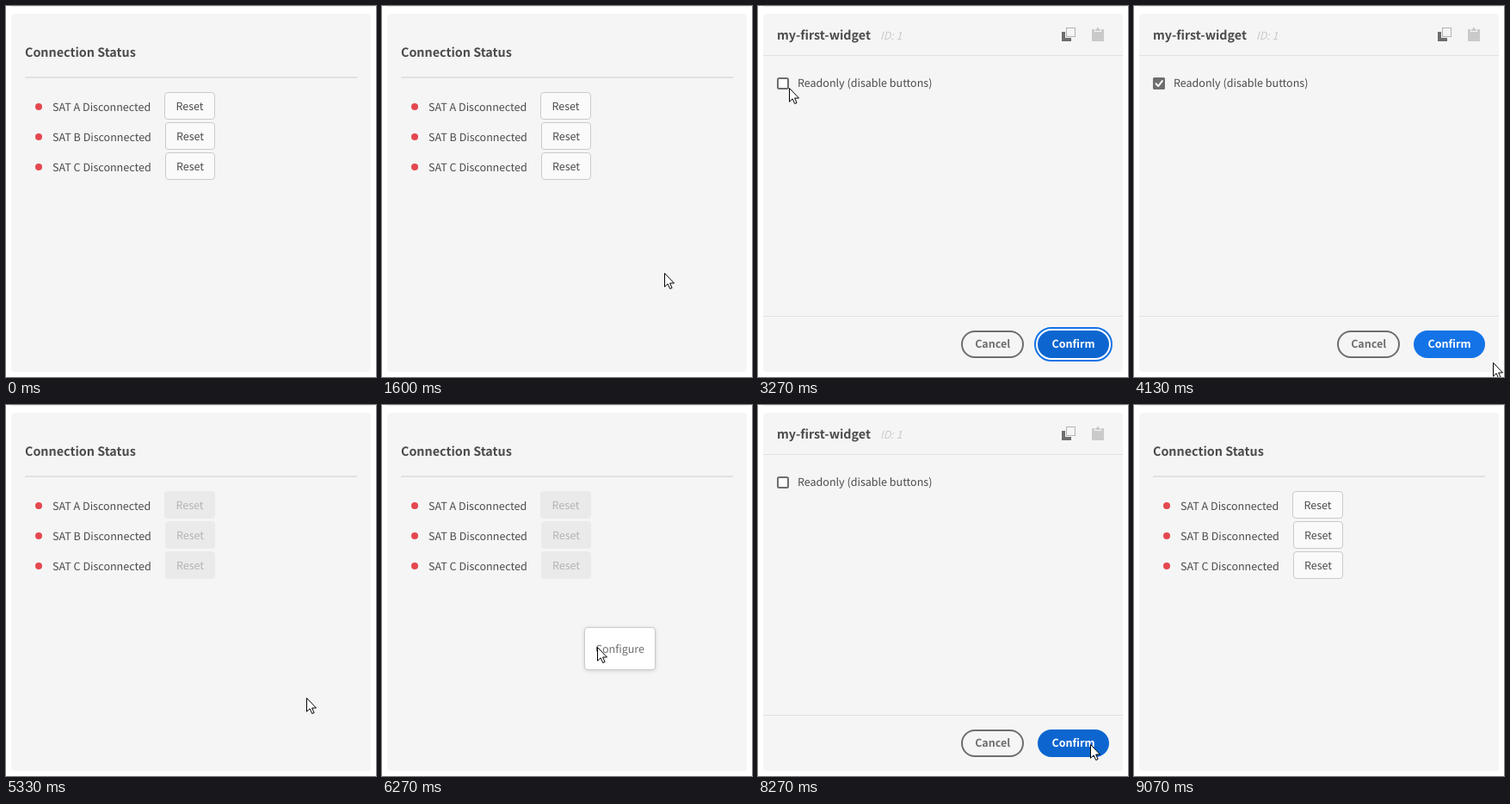
An HTML page that plays this animation: 430 by 431 pixels, repeating every 9870 ms.

```html
<!DOCTYPE html>
<html lang="en">
<head>
<meta charset="utf-8">
<title>Widget configuration</title>
<style>
  html, body { margin: 0; width: 100%; height: 100%; overflow: hidden; background: #fff; }
  svg { display: block; }
  text {
    font: 12.53px "Noto Sans CJK SC", "Noto Sans CJK JP", "Noto Sans CJK", "Noto Sans", sans-serif;
    fill: #4b4b4b; text-rendering: geometricPrecision;
  }
  .title { font-size: 14.32px; }
  .title, .bold { font-weight: 700; }
  .mid { text-anchor: middle; }
  .reset rect { fill: #fafafa; stroke: #cacaca; }
  .disabled .reset rect { fill: #eaeaea; stroke: #eaeaea; }
  .disabled .reset text { fill: #b3b3b3; }
  #popup rect { fill: #fff; stroke: #cacaca; filter: drop-shadow(0 1px 2px rgba(0, 0, 0, .15)); }
</style>
</head>
<body>
<svg width="430" height="431" viewBox="0 0 430 431">
  <rect x="6" width="422" height="1" fill="#eaeaea"/>
  <rect x="6" y="9" width="418" height="416" rx="4" fill="#f5f5f5"/>

  <g id="status">
    <text class="title" x="22" y="59">Connection Status</text>
    <rect x="22" y="82" width="386" height="2" rx="1" fill="#e1e1e1"/>
  </g>

  <g id="dialog">
    <text class="title" x="22" y="39">my-first-widget</text>
    <text x="142" y="39" style="font-style: italic; fill: #cacaca">ID: 1</text>
    <path d="M6 57.5H424M6 360.5H424" stroke="#e1e1e1"/>
    <path d="M353 30h4v7h7v4h-11z" fill="#6e6e6e"/>
    <rect x="358.5" y="25.5" width="10" height="10" fill="none" stroke="#6e6e6e" stroke-dasharray="1"/>
    <path d="M388 27h3v3h8v-3h3v14h-14zM392 29v-2h1.500a1.500 2 0 0 1 3 0h1.500v2z" fill="#cacaca"/>
    <rect x="23" y="84" width="12" height="12" rx="1.5" fill="#fff" stroke="#6e6e6e" stroke-width="2"/>
    <g id="check">
      <rect x="22" y="83" width="14" height="14" rx="2" fill="#6e6e6e"/>
      <path d="M25.500 90.300l2.700 2.800 4.600-6" fill="none" stroke="#fff" stroke-width="2" stroke-linecap="round" stroke-linejoin="round"/>
    </g>
    <text x="46" y="94">Readonly (disable buttons)</text>
    <rect x="237" y="378" width="71" height="30" rx="15" fill="none" stroke="#6e6e6e" stroke-width="2"/>
    <text class="bold mid" x="272.700" y="397" style="fill: #6e6e6e">Cancel</text>
    <rect id="ring" x="322" y="374" width="89" height="38" rx="19" fill="#fff" stroke="#1473e6" stroke-width="2"/>
    <rect id="confirm" x="325" y="377" width="83" height="32" rx="16"/>
    <text class="bold mid" x="366.500" y="397" style="fill: #fff">Confirm</text>
  </g>

  <g id="popup">
    <rect x=".5" y=".5" width="82" height="49" rx="3.5"/>
    <text x="13" y="30" style="fill: #6e6e6e">Configure</text>
  </g>
  <path id="cursor" d="M.5.5v15.700l3.600-3.400 2.600 5.700 2.400-1-2.500-5.500h4.900z" fill="#fff" stroke="#000"/>
</svg>
<script>
const LOOP = 9870, STEP = 1000 / 15;
const $ = id => document.getElementById(id);
const clamp = v => Math.max(0, Math.min(1, v));
const show = (id, on) => { $(id).style.display = on ? '' : 'none'; };

// Pointer path: [step, x, y]; each leg eases in and out.
const path = [
  [15, 355, 432], [26, 325, 298], [28, 325, 298], [33, 340, 321],
  [39, 340, 321], [50, 29, 90], [54, 29, 90], [62, 417, 414],
  [63, 417, 414], [68, 384, 377], [79, 384, 377], [80, 349, 340],
  [82, 235, 258], [88, 235, 258], [94, 250, 281], [101, 250, 281],
  [104, 192, 182], [107, 122, 110], [112, 30, 91], [115, 30, 91],
  [124, 386, 394], [132, 386, 394], [136, 366, 435]
];

['A', 'B', 'C'].forEach((name, i) => {
  const y = 117 + 35 * i, left = i ? 185.5 : 184.5;
  $('status').insertAdjacentHTML('beforeend', `
    <circle cx="38" cy="${y}" r="4" fill="#e34850"/>
    <text x="54" y="${y + 5}">SAT ${name} Disconnected</text>
    <g class="reset">
      <rect x="${left}" y="${y - 16.5}" width="${242.5 - left}" height="31" rx="3.5"/>
      <text class="mid" x="${i ? 214 : 213.5}" y="${y + 4}">Reset</text>
    </g>`);
});

function pointer(step) {
  const i = path.findIndex(p => p[0] >= step);
  if (i < 1) return [0, 500];
  const [s0, x0, y0] = path[i - 1], [s1, x1, y1] = path[i];
  const u = (step - s0) / (s1 - s0), e = u * u * (3 - 2 * u);
  return [Math.round(x0 + (x1 - x0) * e), Math.round(y0 + (y1 - y0) * e)];
}

function draw(now) {
  const step = Math.floor((now % LOOP + 5) / STEP);
  const within = (from, to) => step >= from && step < to;
  const fade = (open, close) => clamp((step - open + 1) / 3) * clamp((close + 2 - step) / 2);

  const dialog = within(38, 70) || within(100, 128);
  const focused = within(40, 54) || within(102, 114);
  const hovered = within(65, 70) || within(122, 128);
  show('dialog', dialog);
  show('status', !dialog);
  show('ring', focused);
  show('check', within(54, 115));
  $('status').classList.toggle('disabled', within(71, 129));
  $('confirm').style.fill = focused || hovered ? '#0d66d0' : '#1473e6';

  $('popup').setAttribute('transform', step < 60 ? 'translate(325 298)' : 'translate(235 258)');
  $('popup').style.opacity = fade(28, 38) + fade(87, 100);
  $('cursor').setAttribute('transform', `translate(${pointer(step)})`);
  requestAnimationFrame(draw);
}
draw(performance.now());
</script>
</body>
</html>
```
